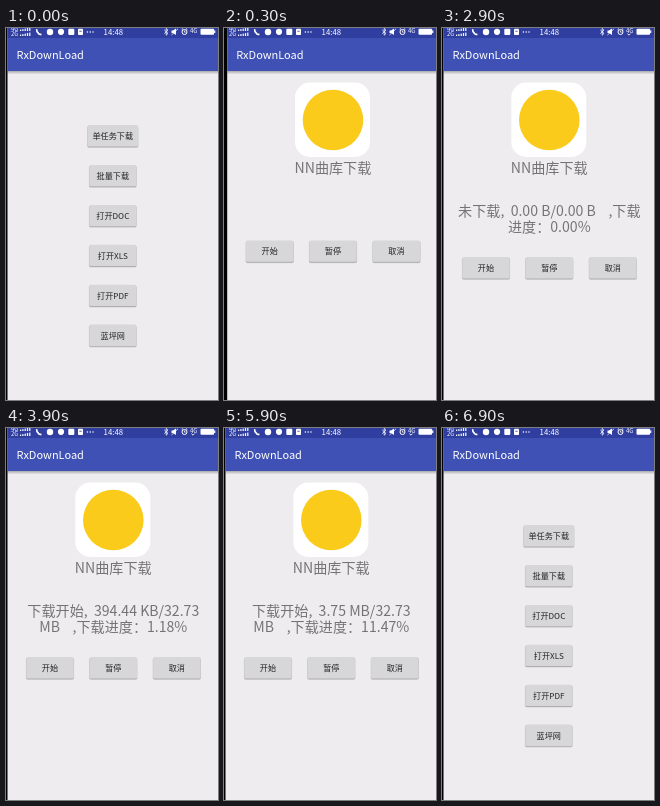
These frames come from a looping animation (212x372 px, 8000 ms). An HTML page with a canvas:

```html
<!DOCTYPE html>
<html lang="zh-CN">
<head>
<meta charset="utf-8">
<title>RxDownLoad</title>
<style>
html, body { margin: 0; width: 100%; height: 100%; overflow: hidden; background: #000; }
canvas { display: block; width: 212px; height: 372px; }
</style>
</head>
<body>
<canvas id="stage"></canvas>
<script>
const W = 212, H = 372, LOOP = 8000, EDGE = 1.5;
const FONT = '"Noto Sans CJK SC", "Noto Sans CJK", "Noto Sans", sans-serif';
const canvas = document.getElementById('stage');
const ctx = canvas.getContext('2d');
const dpr = window.devicePixelRatio || 1;
canvas.width = W * dpr;
canvas.height = H * dpr;

const MENU = ['单任务下载', '批量下载', '打开DOC', '打开XLS', '打开PDF', '蓝坪网'];
const ACTIONS = [['开始', 44], ['暂停', 107.3], ['取消', 170.8]];

// Each entry: start time, first line, second line
const STATUS = [
  [500, '未下载,  0.00 B/0.00 B    ,下载', '进度：0.00%'],
  [3400, '下载开始,  0.00 B/32.73 MB', ',下载进度：0.00%'],
  [3900, ...progress('394.44 KB', '1.18')],
  [4400, ...progress('1.18 MB', '3.61')],
  [4900, ...progress('2.04 MB', '6.23')],
  [5500, ...progress('2.93 MB', '8.95')],
  [5900, ...progress('3.75 MB', '11.47')]
];

function progress(done, percent) {
  return [`下载开始,  ${done}/32.73`, `MB    ,下载进度：${percent}%`];
}

const clamp = v => Math.max(0, Math.min(1, v));
const easeOut = (p, power) => 1 - Math.pow(1 - clamp(p), power);

function rect(x, y, w, h, color) {
  ctx.fillStyle = color;
  ctx.fillRect(x, y, w, h);
}

function round(x, y, w, h, r, color) {
  ctx.fillStyle = color;
  ctx.beginPath();
  ctx.roundRect(x, y, w, h, r);
  ctx.fill();
}

function disc(x, y, r, color) {
  ctx.fillStyle = color;
  ctx.beginPath();
  ctx.arc(x, y, r, 0, Math.PI * 2);
  ctx.fill();
}

function line(width, ...points) {
  ctx.strokeStyle = '#fff';
  ctx.lineWidth = width;
  ctx.beginPath();
  for (let i = 0; i < points.length; i += 2) ctx.lineTo(points[i], points[i + 1]);
  ctx.stroke();
}

function text(str, x, y, size, color, weight = 400, align = 'center') {
  ctx.font = `${weight} ${size}px ${FONT}`;
  ctx.textAlign = align;
  ctx.fillStyle = color;
  ctx.fillText(str, x, y);
}

function button(label, cx, cy, w, press = 0) {
  const x = cx - w / 2, y = cy - 10.9;
  round(x - 0.4, y + 0.6, w + 0.8, 22.2, 2, 'rgba(0,0,0,.12)');
  round(x, y + 0.8, w, 21.4, 1.5, 'rgba(0,0,0,.16)');
  round(x, y, w, 21.3, 1.5, '#d7d6d8');
  if (press) {
    ctx.save();
    ctx.beginPath();
    ctx.roundRect(x, y, w, 21.3, 1.5);
    ctx.clip();
    disc(cx, cy, w * 0.6 * press, 'rgba(0,0,0,.14)');
    ctx.restore();
  }
  text(label, cx, cy + 3, 8.15, '#242424');
}

function pageBase() {
  rect(EDGE, 0, W - EDGE, H, '#eeecee');
  const shade = ctx.createLinearGradient(0, 43, 0, 46.5);
  shade.addColorStop(0, 'rgba(0,0,0,.28)');
  shade.addColorStop(1, 'rgba(0,0,0,0)');
  rect(EDGE, 43, W - EDGE, 3.5, shade);
  rect(EDGE, 10, W - EDGE, 33, '#3f51b5');
  rect(EDGE, 0, W - EDGE, 10, '#303f9f');
  text('RxDownLoad', 10.5, 31, 11, '#fff', 300, 'left');
}

function menuPage() {
  pageBase();
  MENU.forEach((label, i) => button(label, 106.8, 108 + i * 39.9, i ? 47 : 50.5));
}

function pressAt(t) {
  if (t < 2200 || t >= 2400) return 0;
  return t < 2300 ? 0.55 : 1;
}

function taskPage(t) {
  pageBase();
  round(69.3, 54.5, 75, 74.5, 15, '#fff');
  disc(107.3, 92, 30.3, '#fbcb1c');
  text('NN曲库下载', 107.2, 145, 14.1, '#757475', 300);
  const status = STATUS.filter(s => t >= s[0]).pop();
  if (status) {
    text(status[1], 107.3, 187.8, 14.1, '#757475', 300);
    text(status[2], 107.3, 204.4, 14.1, '#757475', 300);
  }
  const y = status ? 240 : 223.4;
  ACTIONS.forEach(([label, x], i) => button(label, x, y, 47.5, i ? 0 : pressAt(t)));
}

function signal(name, y) {
  text(name, 5, y, 5.8, '#fff', 400, 'left');
  for (let i = 0; i < 5; i++) rect(14 + i * 2.3, y - 1.4 - i * 0.5, 1.2, 1.4 + i * 0.5, '#fff');
}

function statusIcons(t) {
  signal('4G', 3);
  signal('2G', 8);
  line(1.6, 30.6, 1.2, 31, 3.6, 33, 6, 35.4, 6.6);
  disc(44, 4, 3.2, '#fff');
  disc(55, 3.8, 3.1, '#fff');
  round(62.3, 0.8, 6, 6.2, 1, '#fff');
  round(72, 0.8, 5, 6.2, 0.8, '#fff');
  rect(73.3, 2.8, 2.4, 0.8, '#303f9f');
  for (let i = 0; i < 3; i++) disc(81.4 + i * 2.8, 4, 0.75, '#fff');
  text('14:48', 107.3, 6.8, 7.8, '#fff');

  line(0.8, 158.3, 2, 162, 5.4, 160.2, 7.2, 160.2, 0.4, 162, 2.2, 158.3, 5.6);
  ctx.fillStyle = '#fff';
  ctx.beginPath();
  ctx.moveTo(165.5, 2.5);
  ctx.lineTo(167, 2.5);
  ctx.lineTo(170, 0.4);
  ctx.lineTo(170, 7);
  ctx.lineTo(167, 5);
  ctx.lineTo(165.5, 5);
  ctx.fill();
  line(0.8, 165.5, 7, 172, 0.8);
  ctx.lineWidth = 1;
  ctx.beginPath();
  ctx.arc(178.5, 4, 2.5, 0, Math.PI * 2);
  ctx.stroke();
  line(0.8, 178.5, 2.6, 178.5, 4.2, 179.7, 4.2);
  line(0.9, 175.6, 1.8, 177, 0.5);
  line(0.9, 180, 0.5, 181.4, 1.8);
  text('4G', 184, 4.6, 6, '#fff', 400, 'left');
  if (t >= 2900 && t < 6900) line(0.9, 185.4, 5.6, 187, 7.2, 188.6, 5.6);
  round(194.5, 0.7, 13.6, 6, 1, '#fff');
  rect(208.1, 2.4, 1.2, 2.6, '#fff');
}

// 0 = task page fully covers the menu, 1 = menu only
function openness(t) {
  if (t < 100 || t >= 6900) return 1;
  if (t < 6400) return 1 - easeOut((t - 20) / 350, 3);
  return easeOut((t - 6390) / 556, 2);
}

function draw(now) {
  const t = Math.floor((now % LOOP) / 100) * 100;
  const open = openness(t);
  ctx.setTransform(dpr, 0, 0, dpr, 0, 0);
  rect(0, 0, W, H, '#000');
  if (open > 0) {
    const s = 0.9 + 0.1 * open;
    ctx.save();
    ctx.translate(W / 2, H / 2);
    ctx.scale(s, s);
    ctx.translate(-W / 2, -H / 2);
    menuPage();
    if (open < 1) rect(EDGE, 0, W - EDGE, H, `rgba(0,0,0,${0.74 * (1 - open)})`);
    ctx.restore();
  }
  if (open < 1) {
    const x = open * W;
    if (open > 0) rect(0, 0, x + EDGE, 10, '#000');
    ctx.save();
    ctx.translate(x, 0);
    taskPage(t);
    ctx.restore();
  }
  statusIcons(t);
}

let start;
function tick(now) {
  if (start === undefined) start = now;
  draw(Math.max(0, now - start));
  requestAnimationFrame(tick);
}
draw(0);
requestAnimationFrame(tick);
</script>
</body>
</html>
```
